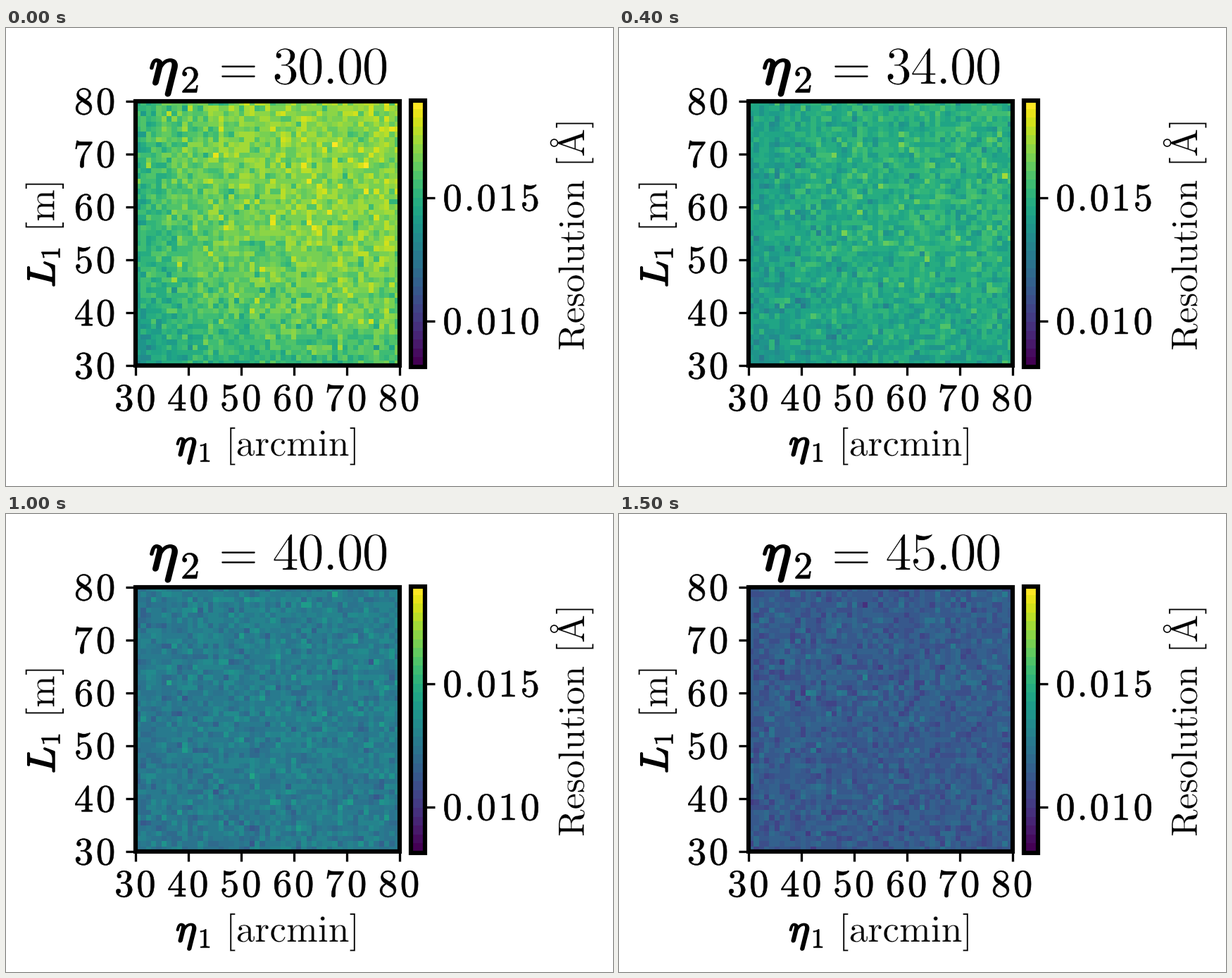
A matplotlib script for the animation above (1600 ms loop, 862 px wide and 650 px high).

```python
import numpy as np
import matplotlib.pyplot as plt
from matplotlib.animation import FuncAnimation
from matplotlib.patches import Circle, PathPatch, Rectangle
from matplotlib.textpath import TextPath
from matplotlib.transforms import Affine2D

W, H, DPI = 862, 650, 128  # power of two keeps the pixel size exact
FRAMES, INTERVAL = 16, 100
PT = 72 / DPI  # points per pixel
CELLS = 51
LEFT, RIGHT, TOP, BOTTOM = 184.3, 559, 103.8, 479
BAR = (575, 595, 480.5, 102.6)
VMIN, VMAX = 0.00816, 0.01893
STYLES = {"bold": r"$\mathbf{%s}$", "roman": r"$\mathrm{%s}$", "italic": "$%s$"}

plt.rcParams["mathtext.fontset"] = "cm"
fig = plt.figure(figsize=(W / DPI, H / DPI), dpi=DPI, facecolor="white")
ax = fig.add_axes([0, 0, 1, 1])
cmap = plt.get_cmap("viridis", 30)


def glyph_path(s, x, y, size, style, upright=True):
    """Outline with its ink centred on the anchor along the writing direction."""
    path = TextPath((0, 0), STYLES[style] % s, size=size)
    box = path.get_extents()
    place = Affine2D().translate(-(box.x0 + box.x1) / 2, 0).scale(1, -1)
    if not upright:
        place.rotate_deg(-90)
    return place.translate(x, y).transform_path(path)


def write(s, x, y, size, style="roman", upright=True, edge=0.0, ec="black"):
    path = glyph_path(s, x, y, size, style, upright)
    patch = PathPatch(path, fc="black", ec=ec if edge else "none",
                      lw=edge * PT, joinstyle="round")
    return ax.add_patch(patch)


def cells(s, x, digit):
    """Yield each character with the centre of its cell."""
    for ch in s:
        w = digit * 0.555 if ch == "." else digit
        yield ch, x + w / 2
        x += w


def tick_label(s, x, y):
    for ch, cx in cells(s, x, 31):
        write(ch, cx, y, 55, "bold", edge=0.6)


def line(xs, ys):
    ax.plot(xs, ys, color="black", lw=3.3 * PT, solid_capstyle="butt")


def frame_box(x0, x1, y0, y1):
    ax.add_patch(Rectangle((x0, y0), x1 - x0, y1 - y0, fill=False, ec="black",
                           lw=6.2 * PT, joinstyle="miter", zorder=3))


def field(i):
    """Noisy resolution map for one value of the second angle."""
    eta = 30 + i
    rng = np.random.default_rng(100 + i)
    u, v = np.meshgrid(np.linspace(0, 1, CELLS), np.linspace(0, 1, CELLS))
    dip = 0.6 * np.exp(-4 * u) + 0.5 * np.exp(-3.5 * v)
    mean = 0.513 / eta - 0.0032 * np.exp(-i / 5) * dip
    return mean * (1 + 0.038 * rng.standard_normal(mean.shape))


# Heat map and colour bar
heat = ax.imshow(field(0), cmap=cmap, vmin=VMIN, vmax=VMAX, origin="lower",
                 extent=(LEFT, RIGHT, BOTTOM, TOP), aspect="auto",
                 interpolation="nearest")
ax.imshow(np.arange(30)[:, None], cmap=cmap, origin="lower", extent=BAR,
          aspect="auto", interpolation="nearest")
ax.set(xlim=(0, W), ylim=(H, 0))
ax.axis("off")
ax.set_autoscale_on(False)
frame_box(LEFT, RIGHT, TOP, BOTTOM)
frame_box(BAR[0], BAR[1], BAR[3], BAR[2])

# Ticks
for k in range(6):
    label = str(30 + 10 * k)
    x = LEFT + k * (RIGHT - LEFT) / 5
    y = BOTTOM - k * (BOTTOM - TOP) / 5
    line([x, x], [BOTTOM, BOTTOM + 14.3])
    line([LEFT - 14.3, LEFT], [y, y])
    tick_label(label, x - 32, 543)
    tick_label(label, 95, y + 18.5)
for label, y in (("0.015", 240.5), ("0.010", 415.5)):
    line([595, 609], [y, y])
    tick_label(label, 618.5, y + 18.7)

# Axis labels
write(r"\eta", 256, 607, 56, "italic", edge=2.4)
write("1", 282.5, 615.5, 39, "bold", edge=0.6)
write("[arcmin]", 407, 607, 53.6, edge=0.3, ec="white")
write("L", 69, 349, 55, "italic", upright=False, edge=2.2)
write("1", 76.5, 319.5, 39, "bold", upright=False, edge=0.6)
write("[m]", 68.5, 252, 54.5, upright=False, edge=0.3, ec="white")
write("Resolution", 821, 336.5, 52.3, upright=False, edge=0.3, ec="white")
write("[A]", 821, 163, 53.5, upright=False, edge=0.3, ec="white")
ax.add_patch(Circle((778.5, 163), 5, fill=False, ec="black", lw=1.6 * PT))

# Title
write(r"\eta", 224, 79.8, 78, "italic", edge=3.2)
write("2", 261.5, 91.5, 54, "bold", edge=0.8)
write("=", 330, 79.8, 72, edge=0.4, ec="white")


def number(i):
    return list(cells(f"{30 + i:.2f}", 379, 35.9))


digits = [write(ch, x, 79.6, 76, edge=0.8, ec="white") for ch, x in number(0)]


def update(i):
    heat.set_data(field(i))
    for patch, (ch, x) in zip(digits, number(i)):
        patch.set_path(glyph_path(ch, x, 79.6, 76, "roman"))
    return [heat, *digits]


anim = FuncAnimation(fig, update, frames=FRAMES, interval=INTERVAL,
                     repeat=True, repeat_delay=0, blit=False)
plt.show()
```
